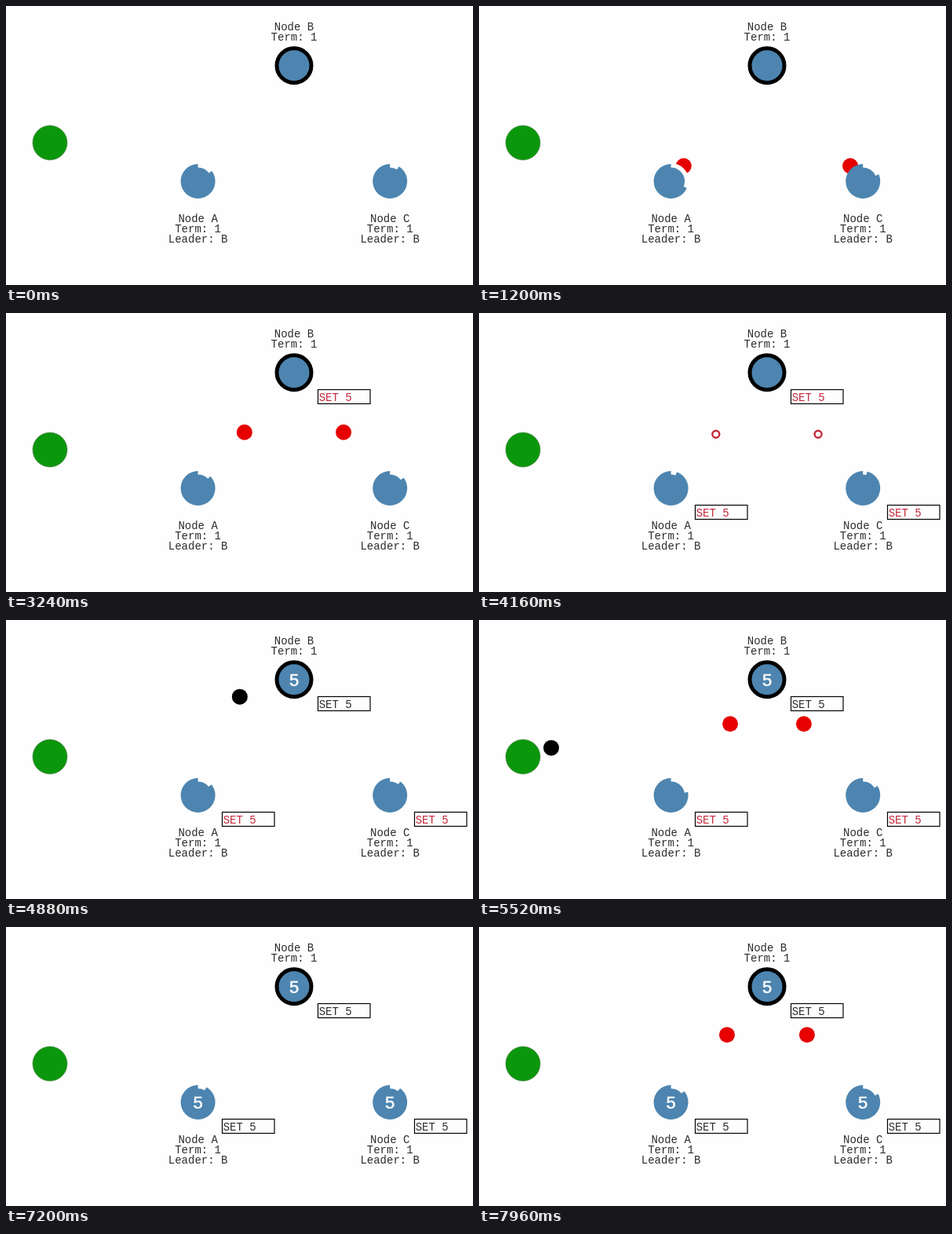
Recreate the animation shown at these times as an HTML page with a canvas. Size 595 px wide and 355 px high, loop 8 s.

```html
<!DOCTYPE html>
<html lang="en">
<head>
<meta charset="utf-8">
<title>Log replication</title>
<style>
  html, body { margin: 0; width: 100%; height: 100%; overflow: hidden; background: #fefefe; }
  canvas { display: block; }
</style>
</head>
<body>
<canvas id="stage" width="595" height="355"></canvas>
<script>
const ctx = document.getElementById('stage').getContext('2d');

const LOOP = 8000;
const LATENCY = 967;
const RADIUS = 22;
const BLUE = '#4d85b0', RED = '#e60000', CRIMSON = '#c4283a', MAROON = '#700814';
const BACKGROUND = '#fefefe', INK = '#2c2c2c';
const MONO = '14px "Liberation Mono", monospace';
const SANS = '22px "Liberation Sans", sans-serif';

const client = { x: 56, y: 174 };
const leader = { x: 367, y: 75.8, logged: 2306, committed: 4666 };
// speeds: degrees per ms of the election timer, one for each heartbeat round
const followers = [
  { name: 'A', x: 244.6, y: 223, logged: 3709, committed: 6117, speeds: [.05, .0241, .0437, .0272] },
  { name: 'C', x: 489.2, y: 223, logged: 3709, committed: 6117, speeds: [.0293, .0274, .0315, .0332] }
];
const heartbeats = [-2027, 362, 2742, 5150, 7558];
const ENTRY_ROUND = 2;

function disc(x, y, r, fill, stroke, width) {
  ctx.beginPath();
  ctx.arc(x, y, r, 0, 2 * Math.PI);
  ctx.fillStyle = fill;
  ctx.fill();
  if (!stroke) return;
  ctx.strokeStyle = stroke;
  ctx.lineWidth = width;
  ctx.stroke();
}

function text(string, x, y, color = INK, align = 'center', font = MONO) {
  ctx.font = font;
  ctx.textAlign = align;
  ctx.fillStyle = color;
  ctx.fillText(string, x, y);
}

function message(time, sent, from, to, ...look) {
  const p = (time - sent) / LATENCY;
  if (p < 0 || p >= 1) return;
  disc(from.x + (to.x - from.x) * p, from.y + (to.y - from.y) * p, ...look);
}

function drawMessages(time) {
  message(time, leader.logged - LATENCY, client, leader, 10, '#000');
  message(time, leader.committed, leader, client, 10, '#000');
  heartbeats.forEach((sent, round) => {
    const ringColor = round === ENTRY_ROUND ? CRIMSON : MAROON;
    for (const node of followers) {
      message(time, sent, leader, node, 10, RED);
      message(time, sent + LATENCY, node, leader, 4.5, BACKGROUND, ringColor, 2.4);
    }
  });
}

// White notch that grows clockwise from the top until the next heartbeat arrives
function drawTimer(time, node) {
  const round = heartbeats.findLastIndex(sent => sent + LATENCY <= time);
  const elapsed = time - heartbeats[round] - LATENCY;
  const angle = elapsed * node.speeds[round] * Math.PI / 180;
  ctx.beginPath();
  ctx.arc(node.x, node.y, 20.2, -Math.PI / 2, angle - Math.PI / 2);
  ctx.strokeStyle = BACKGROUND;
  ctx.lineWidth = 5.4;
  ctx.stroke();
}

function drawValue(node) {
  text('5', node.x, node.y + 7.8, '#f8fafc', 'center', SANS);
  ctx.strokeStyle = '#f8fafc';
  ctx.lineWidth = .6;
  ctx.strokeText('5', node.x, node.y + 7.8);
}

function drawState(time, node) {
  const committed = time >= node.committed;
  if (committed) drawValue(node);
  if (time < node.logged) return;
  const left = Math.round(node.x + 30.4) + .5, top = Math.round(node.y + 21.4) + .5;
  ctx.strokeStyle = '#000';
  ctx.lineWidth = 1.2;
  ctx.strokeRect(left, top, 66.5, 18);
  text('SET 5', left + 1.2, top + 14.5, committed ? INK : CRIMSON, 'left');
}

function draw(time) {
  ctx.fillStyle = BACKGROUND;
  ctx.fillRect(0, 0, 595, 355);
  drawMessages(time);

  disc(client.x, client.y, RADIUS, '#0b970b', '#4c7a4c', .6);
  disc(leader.x, leader.y, RADIUS, BLUE, '#000', 5);
  text('Node B', leader.x, 30.5);
  text('Term: 1', leader.x, 44);
  drawState(time, leader);

  for (const node of followers) {
    disc(node.x, node.y, RADIUS, BLUE);
    drawTimer(time, node);
    text('Node ' + node.name, node.x, 274.8);
    text('Term: 1', node.x, 288);
    text('Leader: B', node.x, 301);
    drawState(time, node);
  }
}

const start = performance.now();
function frame() {
  draw((performance.now() - start) % LOOP);
  requestAnimationFrame(frame);
}
frame();
</script>
</body>
</html>
```
